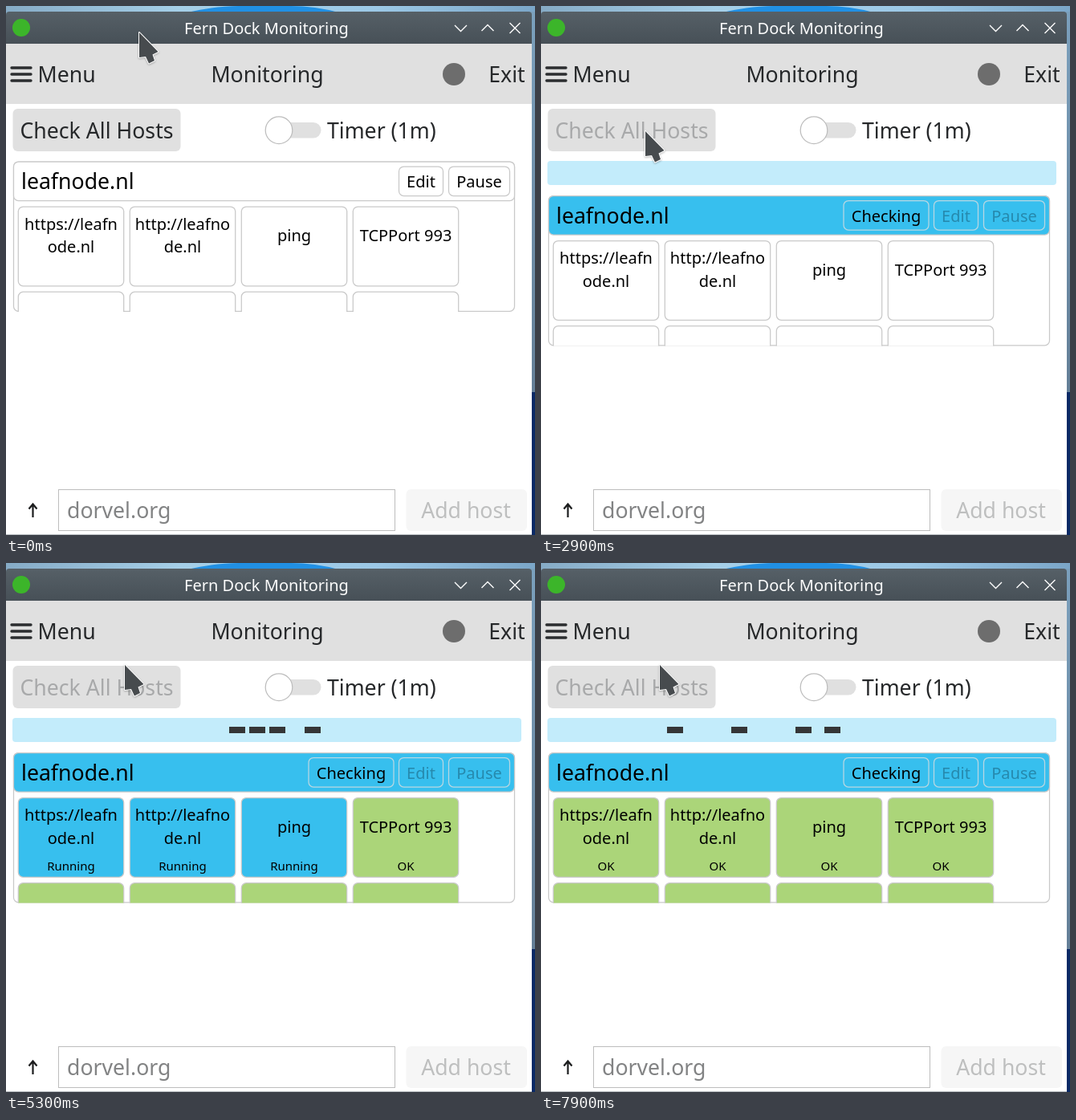
An HTML page for the animation above (8000 ms loop, 659 px wide and 659 px high).

```html
<!DOCTYPE html>
<html lang="en">
<head>
<meta charset="utf-8">
<title>Host monitoring</title>
<style>
  html, body { margin: 0; width: 100%; height: 100%; overflow: hidden; background: #fff; }
  svg { display: block; }
  #stage { width: 100vw; height: 100vh; }
  text { font-family: "Noto Sans", "Open Sans", sans-serif; font-size: 20px; }
  .big { font-size: 26.67px; fill: #26282a; }
  .small { font-size: 15px; }
  .mid { text-anchor: middle; }
  .line { fill: none; stroke: #c9c9c9; stroke-width: 1.25; }
</style>
</head>
<body>
<svg id="stage" viewBox="0 0 659 659">
  <defs>
    <linearGradient id="bar" x2="0" y2="1">
      <stop stop-color="#566067"/><stop offset="1" stop-color="#475057"/>
    </linearGradient>
    <linearGradient id="sky">
      <stop stop-color="#86abc6"/><stop offset=".33" stop-color="#a5cfe8"/>
      <stop offset=".7" stop-color="#9cc8e6"/><stop offset="1" stop-color="#7ba6c8"/>
    </linearGradient>
    <linearGradient id="side" x2="0" y2="1">
      <stop stop-color="#7ba0bd"/><stop offset="1" stop-color="#647f97"/>
    </linearGradient>
  </defs>

  <!-- desktop behind the window -->
  <rect width="659" height="20" fill="url(#sky)"/>
  <path d="M226 8Q262 0 290 0H355Q385 0 414 8Z" fill="#2190e4"/>
  <rect x="654" y="7" width="5" height="474" fill="url(#side)"/>
  <rect x="654" y="481" width="5" height="178" fill="#0a2a66"/>

  <!-- window frame -->
  <path d="M0 47V11Q0 7 4 7H651Q655 7 655 11V47Z" fill="url(#bar)"/>
  <rect y="47" width="655" height="612" fill="#fff"/>
  <rect y="47" width="655" height="75" fill="#e0e0e0"/>
  <path d="M0 658.5H655" stroke="#b9bec2"/>
  <circle cx="19" cy="27" r="11" fill="#3cb52a"/>
  <text class="mid" x="324.5" y="35" fill="#fcfcfc">Fern Dock Monitoring</text>
  <path d="M559 24l7.500 7.500 7.500-7.500M592.500 31l7.500-7.500 7.500 7.500M627.500 21l13 13m0-13l-13 13"
        fill="none" stroke="#fcfcfc" stroke-width="1.400"/>

  <!-- header -->
  <path d="M7 77H31M7 85H31M7 93H31" stroke="#2b2d2f" stroke-width="3.400" stroke-linecap="round"/>
  <text class="big" x="39.500" y="94.500">Menu</text>
  <text class="big mid" x="325.500" y="94.500">Monitoring</text>
  <circle cx="558" cy="85" r="14" fill="#6d6d6d"/>
  <text class="big mid" x="624" y="94.500">Exit</text>

  <!-- tools -->
  <rect id="check" x="8.500" y="128" width="209" height="53" rx="6"/>
  <text id="checkText" class="big mid" x="113" y="164.500">Check All Hosts</text>
  <rect x="325" y="145" width="67.500" height="19.500" rx="9.750" fill="#e0e0e0"/>
  <circle cx="340" cy="154.700" r="16.800" fill="#fff" stroke="#bdbdbd" stroke-width="1.250"/>
  <text class="big" x="400" y="164.500">Timer (1m)</text>

  <!-- progress -->
  <g id="progress">
    <rect x="8" y="193" width="634" height="30" rx="4" fill="#c3ecfb"/>
    <svg id="blocks" x="11" y="204" width="628" height="8" fill="#353637" shape-rendering="crispEdges"></svg>
  </g>

  <!-- host card -->
  <g id="card">
    <rect class="line" x="9.500" y="194" width="624" height="186.300" rx="6"/>
    <rect id="head" class="line" x="9.500" y="194" width="624" height="48.500" rx="6"/>
    <text class="big" style="fill:#000" x="19" y="228">leafnode.nl</text>
    <g id="buttons"></g>
    <svg y="194" width="659" height="187"><g id="tiles" transform="translate(0 -194)"></g></svg>
  </g>

  <!-- footer -->
  <path d="M33.500 637V621M28.500 626.500L33.500 620.500L38.500 626.500" fill="none" stroke="#1c1d1e" stroke-width="2.200"/>
  <rect x="65.500" y="602.500" width="419" height="51" fill="#fff" stroke="#bdbdbd"/>
  <text class="big" style="fill:#828384" x="76" y="638">dorvel.org</text>
  <rect x="498.500" y="602" width="150.500" height="52" rx="6" fill="#f6f6f6"/>
  <text class="big mid" style="fill:#bebfbf" x="573" y="638">Add host</text>

  <path id="cursor" d="M0 0V31L8 30L12 38.500L19 35L16.500 27.500L23.500 24Z" fill="#474b4e"
        stroke="#fff" stroke-width="2" stroke-linejoin="round" paint-order="stroke"
        style="filter:drop-shadow(.5px 1.500px 1px #0004)"/>
</svg>
<script>
const LOOP = 8000, STEP = 100;
const BLUE = '#37bfee', GREEN = '#abd579', WHITE = '#fff';
const START = 2900;

const $ = id => document.getElementById(id);

function add(parent, tag, attrs, text = '') {
  const el = document.createElementNS('http://www.w3.org/2000/svg', tag);
  for (const key in attrs) el.setAttribute(key, attrs[key]);
  el.textContent = text;
  parent.append(el);
  return el;
}

const buttons = [['Checking', 377, 106], ['Edit', 489.5, 55], ['Pause', 551.5, 76]].map(([label, x, w]) => {
  const g = add($('buttons'), 'g', {});
  return {
    g,
    box: add(g, 'rect', { class: 'line', x, y: 200, width: w, height: 36.5, rx: 6 }),
    text: add(g, 'text', { class: 'mid', x: x + w / 2, y: 226.3 }, label)
  };
});

// Each tile: label lines, time it finishes.
const tiles = [
  [['https://leafn', 'ode.nl'], 7600],
  [['http://leafno', 'de.nl'], 7500],
  [['ping'], 7300],
  [['TCPPort 993'], 4300],
  [[], 4200], [[], 4200], [[], 4200], [[], 4200]
].map(([lines, done], i) => {
  const x = 15.3 + 139 * (i % 4), y = i < 4 ? 250 : 356.2, cx = x + 65.7;
  const box = add($('tiles'), 'rect', { class: 'line', x, y, width: 131.4, height: 98.8, rx: 6 });
  lines.forEach((line, n) => add($('tiles'), 'text',
    { class: 'mid', x: cx, y: 293 + (n - (lines.length - 1) / 2) * 28.5 }, line));
  const status = i < 4 && add($('tiles'), 'text', { class: 'mid small', x: cx, y: 340 });
  return { box, status, done };
});

const blocks = [0, 1, 2, 3].map(() => add($('blocks'), 'rect', { width: 20, height: 8 }));

// Blocks ease in to the centre, rest, then leave one by one.
function blockX(i, t) {
  const width = 629, rest = width / 2 + 27.5 - 25 * i;
  if (t < 1600) return Math.min(rest, -20 - 80 * i + width * 1.6 * (t / 1600) ** 2);
  return rest + Math.max(0, t - 2400 - 95 * i) * width / 1000;
}

// Cursor moves: start time, then one position per step.
const moves = [
  [0, [166, 33]],
  [900, [170, 39], [180, 50], [190, 67], [189, 85], [166, 100], [148, 112], [160, 122], [180, 130],
    [174, 149], [160, 151], [145, 154], [130, 156]],
  [4500, [134, 149], [142, 137], [148, 127]]
];

function cursorAt(t) {
  const [from, ...points] = moves.filter(m => m[0] <= t).pop();
  return points[Math.min(points.length - 1, Math.floor((t - from) / STEP))];
}

function draw(now) {
  const t = Math.floor(now % LOOP / STEP) * STEP;
  const busy = t >= START;

  $('check').style.fill = t >= 2700 && !busy ? '#bdbdbd' : '#e0e0e0';
  $('checkText').style.fill = busy ? '#a8a9aa' : '#26282a';
  $('progress').style.display = busy ? '' : 'none';
  $('card').setAttribute('transform', `translate(0 ${busy ? 42.5 : 0})`);
  $('head').style.fill = busy ? BLUE : WHITE;

  buttons.forEach(({ g, box, text }, i) => {
    g.style.display = busy || i ? '' : 'none';
    box.style.stroke = busy ? '#b9d7e2' : '';
    text.style.fill = busy && i ? '#2689ad' : '#000';
  });

  for (const { box, status, done } of tiles) {
    const state = t >= done ? 'OK' : t >= 4100 ? 'Running' : '';
    box.style.fill = { OK: GREEN, Running: BLUE }[state] || WHITE;
    if (status) status.textContent = state;
  }

  if (busy) blocks.forEach((b, i) => b.setAttribute('x', Math.round(blockX(i, (t - 2870) % 4014))));
  $('cursor').setAttribute('transform', `translate(${cursorAt(t)})`);
}

const begin = performance.now();
function tick() {
  draw(performance.now() - begin);
  requestAnimationFrame(tick);
}
tick();
</script>
</body>
</html>
```
